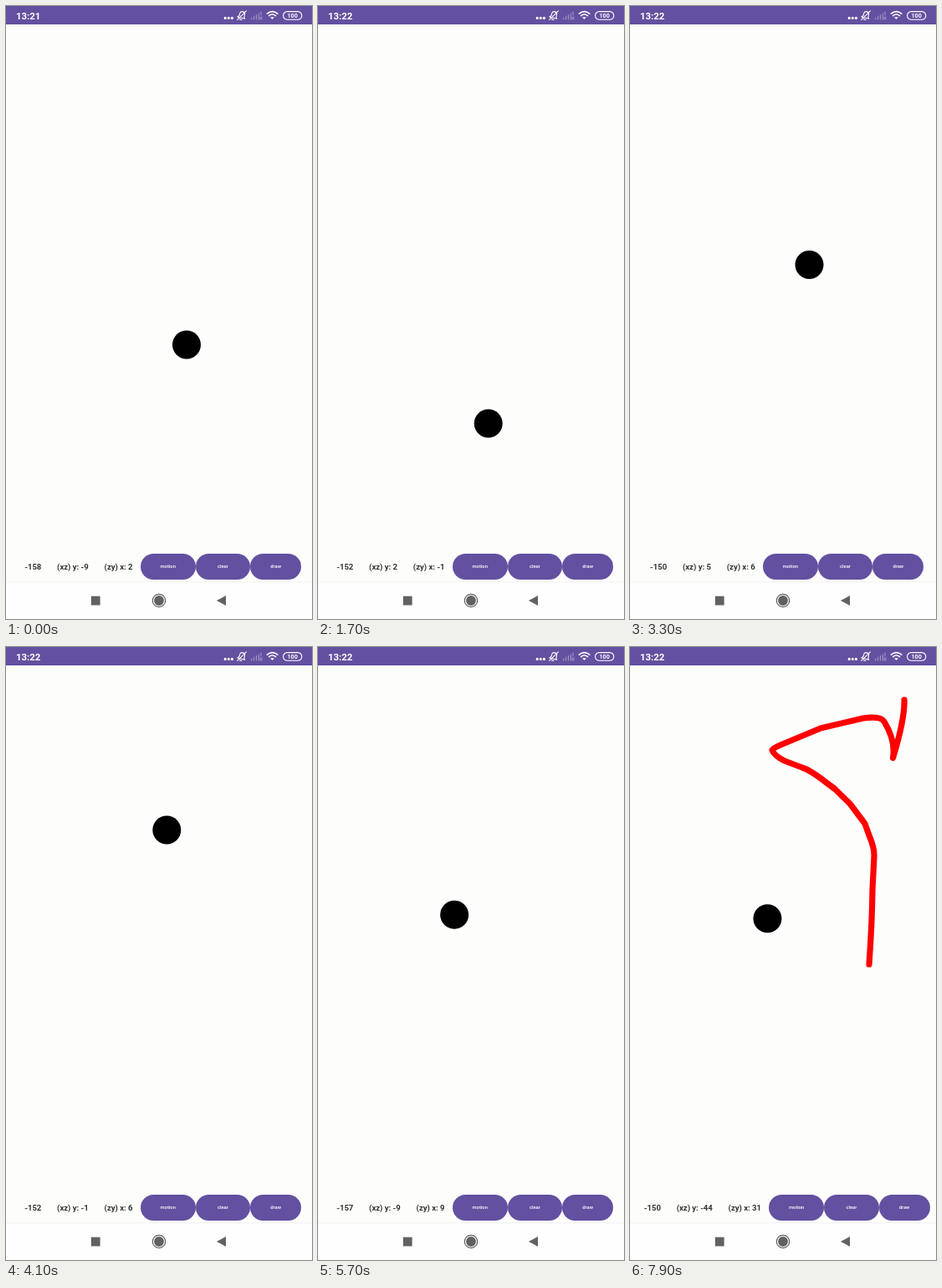
An HTML page for the animation above (8000 ms loop, 366 by 732 pixels).

```html
<!DOCTYPE html>
<html lang="en">
<head>
<meta charset="utf-8">
<title>Motion ball</title>
<style>
  html, body { margin: 0; width: 100%; height: 100%; overflow: hidden; background: #fdfefc; }
  svg { position: absolute; left: 0; top: 0; }
  svg text { font: 700 11.4px Roboto, sans-serif; fill: #fff; }
  svg .small { font-size: 7.2px; text-anchor: middle; }
  .thin { fill: none; stroke: #fff; stroke-width: 1.1; stroke-linecap: round; stroke-linejoin: round; }
  .row {
    position: absolute; left: 0; top: 654.2px; width: 366px; height: 30.6px;
    display: flex; justify-content: center; align-items: center;
    font: 700 9.5px Roboto, sans-serif; color: #333; white-space: pre;
  }
  .row span { flex: none; padding: 0 9.4px; }
  .row b {
    flex: none; width: 65.6px; height: 100%; border-radius: 16px;
    background: #6350a0; color: #fff; text-align: center;
    font: 500 5.8px/30.6px Roboto, sans-serif; position: relative; overflow: hidden;
  }
  .row b:last-child { width: 61px; }
  #ripple { position: absolute; inset: 0; background: #fff; }
</style>
</head>
<body>
<svg width="366" height="732" viewBox="0 0 366 732">
  <rect width="366" height="22" fill="#6350a0"/>
  <text id="clock" x="12" y="15.8"></text>
  <path d="M262.2 14.4h0M266.3 14.4h0M270.4 14.4h0" class="thin" style="stroke-width:3.2"/>
  <g class="thin">
    <path d="M277.5 14.2H286.6L285.2 12.3V9.5C285.2 5.7 279.2 5.7 279.2 9.5V12.3ZM281 16.3H283.4" transform="rotate(15 282 11)"/>
    <path d="M276.8 16.4L287.4 5.8"/>
  </g>
  <g class="thin" opacity=".4">
    <path d="M293.8 16V14M296.6 16V12.4M299.4 16V10.6M302.2 16V8.8M305 11V7"/>
    <path d="M303.8 13.2L306.2 15.8M306.2 13.2L303.8 15.8"/>
  </g>
  <g class="thin" style="stroke-width:1.6">
    <path d="M312.4 9.2Q318.6 4 324.8 9.2M314.6 11.6Q318.6 8.4 322.6 11.6"/>
    <path d="M316.8 13.6H320.4L318.6 15.4Z" fill="#fff" stroke-width=".6"/>
  </g>
  <rect x="331.6" y="6.6" width="22.2" height="9.6" rx="4.8" class="thin"/>
  <text x="342.7" y="14" class="small">100</text>

  <circle id="ball" r="17"/>
  <path id="line" fill="none" stroke="#f00" stroke-width="7.2" stroke-linecap="round" stroke-linejoin="round"
    d="M286 379Q289.5 330 290 290L292 250Q292.5 240 286 225L281 211L263 187L245 169.5L229 157.5Q215 147 206 144L185 136Q172 129.5 170 123Q171 121 180 117L228 97L279 85Q300 82 304 89Q318 112 314.5 132.5Q329 85 328 63"/>

  <rect y="687.5" width="366" height="44.5" fill="#fefefe"/>
  <rect y="687.3" width="366" height="1" fill="#f1f1f1"/>
  <g fill="#616161">
    <rect x="101.8" y="704.7" width="10.8" height="10.8"/>
    <circle cx="183" cy="710" r="5.9"/>
    <circle cx="183" cy="710" r="7.7" fill="none" stroke="#616161" stroke-width="1.2"/>
    <path d="M252 710L263 704V716Z"/>
  </g>
</svg>
<div class="row">
  <span id="angle"></span><span id="tiltY"></span><span id="tiltX"></span>
  <b>motion<i id="ripple"></i></b><b>clear</b><b>draw</b>
</div>
<script>
const LOOP = 8000, STEP = 100;
const $ = id => document.getElementById(id);
const clamp = v => Math.min(1, Math.max(0, v));

// Turning points of the ball: time, x, y
const ballKeys = [
  [700, 216, 404.5], [1100, 220, 441.5], [1650, 210, 499], [2300, 97, 441.3], [3300, 214.5, 309],
  [4000, 196, 215.5], [4900, 159, 315.6], [5200, 157, 299.5], [5900, 164.4, 324.2]
];
// Sensor readings: time, angle, y, x
const sensorKeys = [
  [0, -158, -9, 2], [1100, -159, -9, 1], [2300, -145, 12, -3], [3300, -150, 5, 6],
  [4900, -155, -8, 6], [5700, -157, -9, 9], [6300, -159, -25, 20], [7900, -150, -44, 31]
];

const linear = (p, q, u) => p + (q - p) * u;

// Cubic curve with the given slopes at its two ends.
const hermite = (p, q, u, m, k) =>
  p + u * (m + u * (3 * (q - p) - 2 * m - k + u * (2 * (p - q) + m + k)));

function sample(keys, t, blend) {
  const next = keys.findIndex(k => k[0] > t);
  const i = next < 0 ? keys.length - 2 : Math.max(0, next - 1);
  const span = keys[i + 1][0] - keys[i][0];
  const u = clamp((t - keys[i][0]) / span);
  const slope = (j, n) => {
    const a = keys[j - 1], b = keys[j + 1];
    return a && b ? (b[n] - a[n]) / (b[0] - a[0]) * span : 0;
  };
  return keys[i].slice(1).map((v, c) =>
    blend(v, keys[i + 1][c + 1], u, slope(i, c + 1), slope(i + 1, c + 1)));
}

const line = $('line'), lineLength = line.getTotalLength();

function render(t) {
  const [x, y] = sample(ballKeys, t, hermite);
  $('ball').setAttribute('cx', x);
  $('ball').setAttribute('cy', y);

  // The stroke starts quickly and slows down towards its end.
  const drawn = 1 - (1 - clamp((t - 6100) / 1800)) ** 1.53;
  line.style.strokeDasharray = `${drawn * lineLength} ${lineLength * 2}`;
  line.style.visibility = t < 6100 ? 'hidden' : 'visible';

  const [angle, tiltY, tiltX] = sample(sensorKeys, t, linear).map(v => Math.round(v) || 0);
  $('angle').textContent = angle;
  $('tiltY').textContent = `(xz) y: ${tiltY}`;
  $('tiltX').textContent = `(zy) x: ${tiltX}`;
  $('ripple').style.opacity = 0.2 * clamp(1.5 - Math.abs(t - 1050) / 150);
  $('clock').textContent = t < 1500 ? '13:21' : '13:22';
}

const start = performance.now();
function tick(now) {
  const t = Math.max(0, now - start) % LOOP;
  render(Math.floor(t / STEP) * STEP);
  requestAnimationFrame(tick);
}
render(0);
requestAnimationFrame(tick);
</script>
</body>
</html>
```
